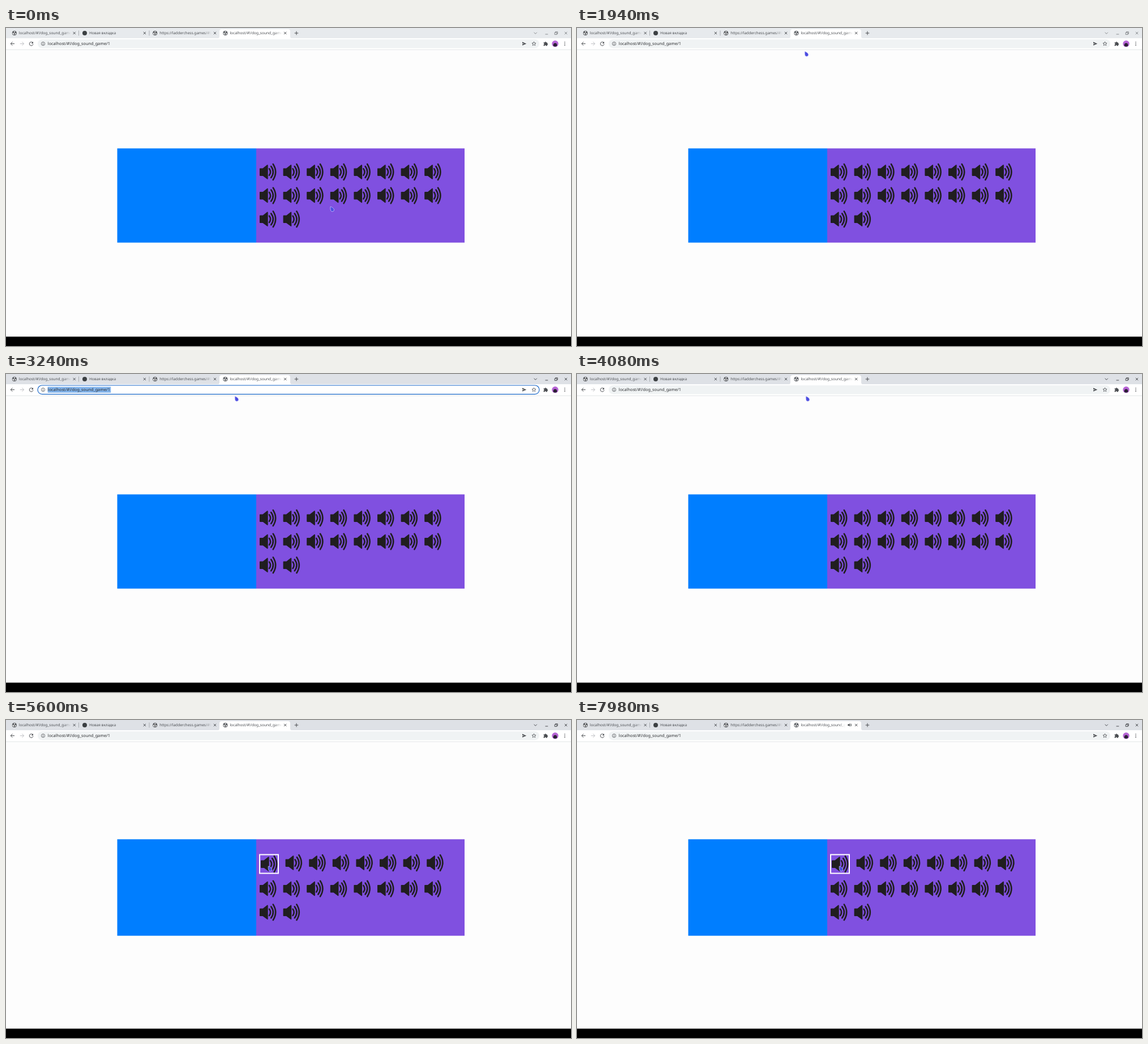
An HTML page that plays this animation: 998 px wide and 561 px high, repeating every 8 s.

```html
<!DOCTYPE html>
<html lang="en">
<head>
<meta charset="utf-8">
<title>Sound game</title>
<style>
  html, body { margin: 0; width: 100%; height: 100%; overflow: hidden; background: #fdfdfd; }
  svg { display: block; width: 100vw; height: 100vh; }
  text { font-family: "Noto Sans", "Open Sans", sans-serif; text-rendering: geometricPrecision; white-space: pre; }
  .line { fill: none; stroke: #4a4d51; stroke-width: 1; }
</style>
</head>
<body>
<svg viewBox="0 0 998 561" preserveAspectRatio="none">
  <defs>
    <linearGradient id="fade" gradientUnits="userSpaceOnUse" x1="79" x2="92" y1="0" y2="0">
      <stop stop-color="#4a4d51"/><stop offset="1" stop-color="#4a4d51" stop-opacity="0"/>
    </linearGradient>
    <linearGradient id="fadeShort" gradientUnits="userSpaceOnUse" x1="67" x2="79" y1="0" y2="0">
      <stop stop-color="#4a4d51"/><stop offset="1" stop-color="#4a4d51" stop-opacity="0"/>
    </linearGradient>
    <g id="globe">
      <circle r="4" fill="#55585c"/>
      <path d="M-3 -.8L-1 .2L-.6 1.6L-1.2 2.9A3.2 3.2 0 0 1 -3 -.8M-.8 -3L1.6 -2.7L.8 -1.2L-.8 -.7ZM.6 .3L3 .2A3 3 0 0 1 1.3 2.7L.4 1.6Z" fill="#fff"/>
    </g>
    <g id="speaker" fill="#201e20" stroke="#201e20" stroke-linecap="round" stroke-linejoin="round">
      <path d="M-13.4 -5.6H-8.2L-.3 -11.8V12.2L-8.2 6.3H-13.4Z" stroke-width="1.6"/>
      <path d="M2.8 -5.5Q7 .2 2.8 6M6 -9.8Q13.4 .2 6 10.2M9.6 -13.6Q18.4 .2 9.6 14" fill="none" stroke-width="2.6"/>
    </g>
  </defs>

  <rect id="strip" width="998" height="19"/>
  <path d="M373 18.5Q377 18.5 377 14.5V6Q377 2 381 2H498Q502 2 502 6V14.5Q502 18.5 506 18.5Z" fill="#fff"/>
  <path d="M128.5 4.5V13.5M253 4.5V13.5" class="line" style="stroke:#9a9da2;stroke-width:.8"/>
  <g id="tabs"></g>
  <path d="M509.7 9H516.3M513 5.7V12.3" class="line"/>
  <g id="buttons" class="line">
    <path d="M932.6 7.7L935.2 10.3L937.8 7.7M952.5 11H957.3M969.2 8H973V11.5H969.2ZM970.5 8V6.7H974.3V10.2H973M986.8 6.8L991.2 11.2M991.2 6.8L986.8 11.2"/>
  </g>

  <rect y="18" width="998" height="20" fill="#fff"/>
  <rect y="38" width="998" height="506" fill="#fdfdfd"/>
  <rect y="37.8" width="998" height=".8" fill="#dcdfe2"/>
  <rect id="bar" x="56" y="20" width="886" height="15.6" rx="7.8"/>
  <rect id="selection" x="73.6" y="22.6" width="111.6" height="10.4" fill="#84b5ec"/>
  <text x="73.8" y="30.2" font-size="7.28" fill="#2b2d30">localhost/#!/dog_sound_game/1</text>
  <path class="line" d="M15 27.7H8.3M11.4 24.5L8.2 27.7L11.4 30.9"/>
  <path class="line" d="M24.8 27.7H31.5M28.4 24.5L31.6 27.7L28.4 30.9" style="stroke:#bfc1c4"/>
  <path class="line" d="M47.2 25.8A3.3 3.3 0 1 0 47.9 28.4"/>
  <path d="M48 23.9V27.2H44.7Z" fill="#4a4d51"/>
  <circle class="line" cx="65.5" cy="27.7" r="3.1" style="stroke-width:.8"/>
  <path class="line" d="M65.5 27.3V29.5M65.5 25.7V26.5" style="stroke-width:.9"/>
  <path d="M912 24.6L919.2 27.7L912 30.8V28.5L916 27.7L912 26.9Z" fill="#4a4d51"/>
  <path class="line" style="stroke-width:.8" d="M932.5 24.2L933.5 26.5L936 26.7L934.1 28.3L934.7 30.8L932.5 29.5L930.3 30.8L930.9 28.3L929 26.7L931.5 26.5Z"/>
  <path d="M949.6 25.4H951.7A1.2 1.2 0 0 1 954.1 25.4H956V27.3A1.2 1.2 0 0 1 956 29.7V31.4H953.8A1.1 1.1 0 0 0 951.6 31.4H949.6V29.3A1.1 1.1 0 0 0 949.6 27.1Z" fill="#4a4d51"/>
  <circle cx="970" cy="27.7" r="5.7" fill="#b765d6"/>
  <path d="M966.7 31.8V29.6Q967.3 26.6 970 26.6Q972.7 26.6 973.3 29.6V31.8Q970 33.8 966.7 31.8Z" fill="#2b2035"/>
  <g fill="#4a4d51"><circle cx="987" cy="25" r=".8"/><circle cx="987" cy="27.7" r=".8"/><circle cx="987" cy="30.4" r=".8"/></g>

  <rect id="blue" x="196.5" width="245.5" fill="#007eff"/>
  <rect id="purple" x="442" width="368" fill="#8050e0"/>
  <rect id="frame" x="448" y="237.5" width="33" height="33" fill="none" stroke="#fff" stroke-width="2"/>
  <g id="grid"></g>

  <rect y="544.5" width="998" height="17"/>
  <path id="cursor" d="M.4 .4C3.4 1.2 6.8 3.6 6.8 6.2A3.1 3.1 0 0 1 .9 7.4C.2 5.4 .1 2.6 .4 .4Z" fill="#4c4de0" stroke="#d2ceff" stroke-width=".7"/>
</svg>
<script>
const $ = id => document.getElementById(id);
const LOOP = 8000, FOCUS = 2800, BLUR = 3900, CLICK = 5500, SOUND = 5700;
const game = "localhost/#!/dog_sound_game/1";
const titles = [game, "Новая вкладка", "https://ladderchess.games/#!/", game];

$("tabs").innerHTML = titles.map((title, i) => {
  const icon = i === 1 ? '<circle r="4" fill="#3c4043"/>' : '<use href="#globe"/>';
  return `<g transform="translate(${14.8 + i * 124.2} 9)">${icon}
    <g transform="translate(8)"><text class="title" y="2.3" font-size="6.55" fill="url(#fade)">${title}</text></g>
    <path class="line" d="M103.7 -2.2L108 2.1M108 -2.2L103.7 2.1"/></g>`;
}).join("") + `<g id="sound" fill="#3c4043"><path d="M478.2 7.8H479.6L481.6 6V11.6L479.6 9.8H478.2Z"/>
  <path d="M482.6 7.3Q483.9 8.8 482.6 10.3M483.6 6.2Q486 8.8 483.6 11.4" fill="none" stroke="#3c4043" stroke-width=".8"/></g>`;
const lastTitle = document.querySelectorAll(".title")[3];

$("grid").innerHTML = '<use href="#speaker"/>'.repeat(18);
const speakers = [...$("grid").children];

// [time, x, y] of the pointer tip
const path = [[0, 572.7, 314.7], [820, 302.7, 234.5], [1800, 402, 41], [2500, 402, 41], [2750, 402, 31],
  [2950, 402, 31], [3200, 404, 39], [4150, 404, 39], [4840, 463, 257.5], [LOOP, 463, 257.5]];

function pointer(t) {
  const i = path.findIndex(p => p[0] > t);
  const [t0, x0, y0] = path[i - 1], [t1, x1, y1] = path[i];
  const u = (t - t0) / (t1 - t0), k = u * u * (3 - 2 * u);
  return [x0 + (x1 - x0) * k, y0 + (y1 - y0) * k];
}

function set(id, attrs) {
  for (const key in attrs) $(id).setAttribute(key, attrs[key]);
}

function draw(t) {
  const active = t >= FOCUS, typing = active && t < BLUR, picked = t >= CLICK;
  const grow = picked ? 2 : 0;

  set("strip", { fill: active ? "#dee1e6" : "#e7eaed" });
  set("buttons", { opacity: active ? 1 : .6 });
  set("bar", { fill: typing ? "#fff" : "#f0f3f4", stroke: typing ? "#1967c8" : "none", "stroke-width": 1.2 });
  set("selection", { opacity: typing ? 1 : 0 });

  const box = { y: 212.4 - grow, height: 166.2 + 2 * grow };
  set("blue", box);
  set("purple", box);
  set("frame", { opacity: picked ? 1 : 0 });
  speakers.forEach((s, i) => {
    const col = i % 8, row = Math.floor(i / 8);
    const dx = row ? 0 : col ? 2 * grow : grow;
    const dy = row ? grow : col ? -grow : 0;
    s.setAttribute("transform", `translate(${462.2 + col * 41.6 + dx} ${253.8 + row * 41.6 + dy})`);
  });

  set("sound", { opacity: Math.min(1, Math.max(0, (t - SOUND) / 450)) });
  lastTitle.setAttribute("fill", t < SOUND ? "url(#fade)" : "url(#fadeShort)");
  set("cursor", { transform: `translate(${pointer(t)})` });
}

const start = performance.now();
function tick() {
  draw((performance.now() - start) % LOOP);
  requestAnimationFrame(tick);
}
tick();
</script>
</body>
</html>
```
